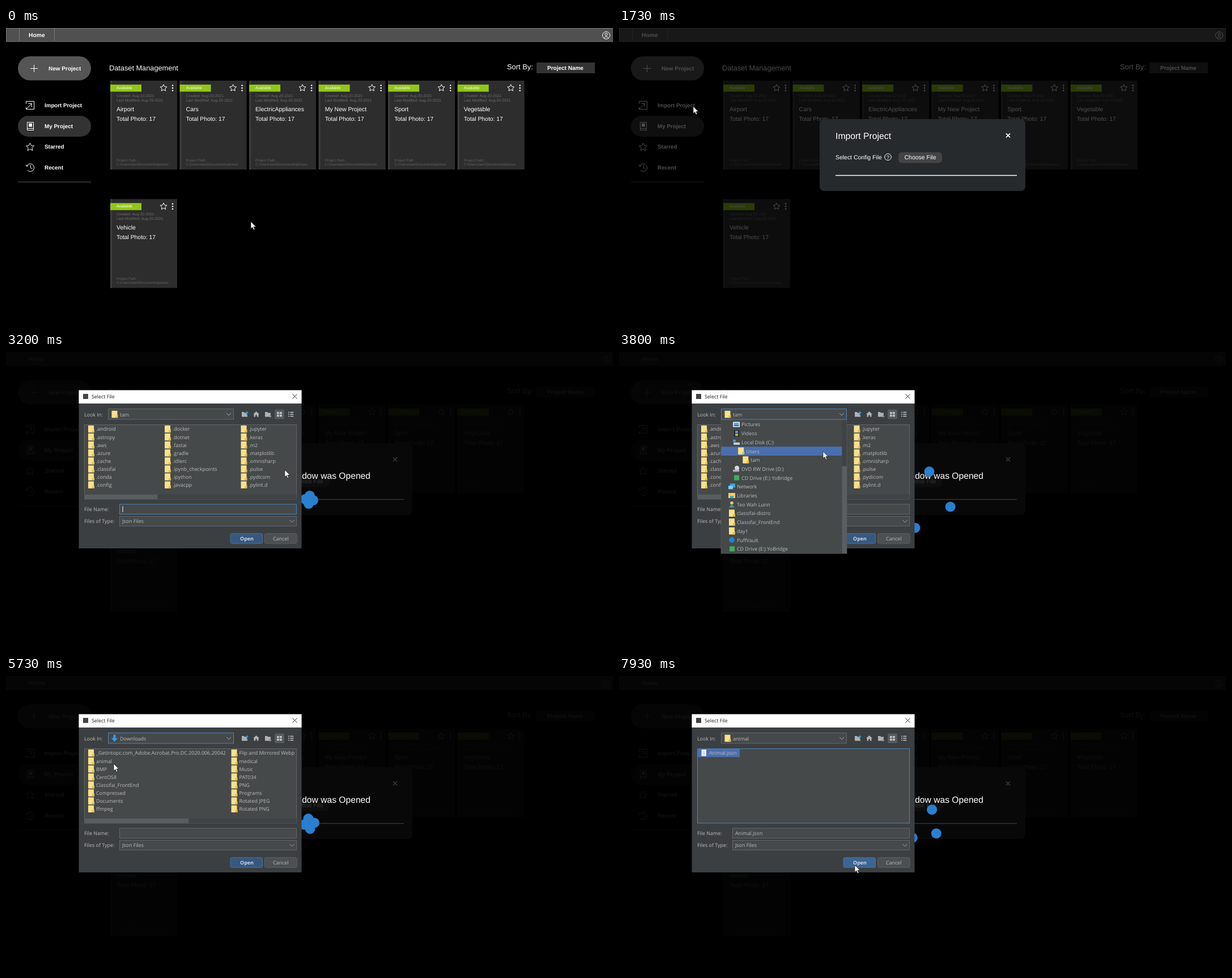
Write an HTML page that moves like this. It is 1071x523 px and loops after 8 s.

```html
<!DOCTYPE html>
<html lang="en">
<head>
<meta charset="utf-8">
<title>Dataset Management</title>
<style>
html, body { margin: 0; width: 100%; height: 100%; overflow: hidden; background: #000; }
svg { display: block; text-rendering: geometricPrecision; }
text { font-family: "Liberation Sans", Arial, sans-serif; white-space: pre; }
.ui text { font-family: "Open Sans", "Noto Sans", sans-serif; }
.line { fill: none; stroke: #fff; stroke-width: 1; }
.focus { stroke: #4a84b8; }
</style>
</head>
<body>
<svg id="stage" width="1071" height="523" viewBox="0 0 1071 523"></svg>
<script>
const LOOP = 8000, FPS = 15;
const USER = 'tam';

// Markup helpers
const text = (x, y, s, size, fill = '#fff', more = '') =>
  `<text x="${x}" y="${y}" font-size="${size}" fill="${fill}" ${more}>${s}</text>`;
const bold = (x, y, s, size = 10, fill = '#fff', more = '') =>
  text(x, y, s, size, fill, 'font-weight="700" ' + more);
const rect = (x, y, w, h, fill, more = '') =>
  `<rect x="${x}" y="${y}" width="${w}" height="${h}" fill="${fill}" ${more}/>`;
const line = (d, more = '') => `<path class="line" d="${d}" ${more}/>`;
const dot = (x, y, r, fill, more = '') => `<circle cx="${x}" cy="${y}" r="${r}" fill="${fill}" ${more}/>`;
const group = (id, body, more = '') => `<g id="${id}" ${more}>${body}</g>`;

function star(cx, cy, r) {
  let d = '';
  for (let i = 0; i < 10; i++) {
    const a = i * Math.PI / 5, q = i % 2 ? r * .48 : r;
    d += `${i ? 'L' : 'M'}${(cx + q * Math.sin(a)).toFixed(2)} ${(cy - q * Math.cos(a)).toFixed(2)}`;
  }
  return line(d + 'Z');
}

// Home page
function card(x, y, name, id) {
  const grey = '#6e6e6e', dim = '#626262';
  return rect(x, y, 118, 157, '#2d2d2d', id ? `id="${id}"` : '') +
    rect(x, y, 3, 157, '#3e3e3e') +
    rect(x, y + 7, 55, 12.5, '#92c61a') +
    text(x + 11, y + 15, 'Available', 6.9) +
    star(x + 94, y + 13, 6.3) +
    [8.5, 13, 17.5].map(v => dot(x + 110, y + v, 1.3, '#fff')).join('') +
    text(x + 11, y + 29, 'Created: Aug-20-2021', 6.75, grey) +
    text(x + 11, y + 37, 'Last Modified: Aug-20-2021', 6.75, grey) +
    text(x + 11, y + 53.5, name, 10.5) +
    text(x + 11, y + 70.5, 'Total Photo: 17', 10.35) +
    text(x + 11, y + 143, 'Project Path :', 6.3, dim) +
    text(x + 11, y + 150, `C:\\Users\\${USER}\\Documents\\picture`, 6.35, dim);
}

const home =
  rect(0, 0, 1071, 24, '#505050') +
  line('M0 .5H1071M0 24H1071M.5 0V24M23.5 0V24M85.5 0V24', 'style="stroke:#757575"') +
  bold(40, 16, 'Home', 10.3) +
  dot(1059, 13, 6.5, 'none', 'class="line"') + dot(1059, 11.2, 2.2, 'none', 'class="line"') +
  line('M1055 17.8Q1059 12.5 1063 17.8') +
  rect(21, 50, 129, 42.5, '#555', 'rx="21.2"') +
  line('M43 71.5H56M49.5 65V78', 'stroke-width="1.2"') +
  bold(75, 75, 'New Project') +
  rect(21, 118.5, 129, 36.5, '#333', 'rx="18" id="importHover"') +
  rect(21, 155.3, 129, 36.7, '#333', 'rx="18.3"') +
  line('M35.5 134V129.5H49.5V143.5H35.5V140M36 143L45 134.2M39.5 133.5H45.3V139.5') +
  line('M37.5 166.5H48.5V180.5H37.5ZM37.5 177.5H48.5') +
  rect(40, 168.5, 6, 6, '#fff') +
  star(42.5, 210.5, 7.3) +
  line('M36.6 244A6.8 6.8 0 1 1 38 251.5M35 241.5L36.6 244.6 39.5 243M43.3 242V247L46.5 249') +
  bold(68, 140.3, 'Import Project', 9.75) + bold(68, 177.3, 'My Project', 9.9) +
  bold(68, 213.3, 'Starred', 9.9) + bold(68, 250, 'Recent', 9.9) +
  line('M21 272H150', 'style="stroke:#5a5a5a"') +
  text(182, 74.5, 'Dataset Management', 12.75) +
  text(884, 73, 'Sort By:', 12.9) +
  rect(936, 61, 103, 19, '#333') + bold(955, 74, 'Project Name') +
  ['Airport', 'Cars', 'ElectricAppliances', 'My New Project', 'Sport', 'Vegetable']
    .map((n, i) => card(184 + 122.55 * i, 93, n, i ? '' : 'firstCard')).join('') +
  card(184, 302.3, 'Vehicle');

const modal =
  rect(354, 161, 363, 127, '#262a2d', 'rx="8"') +
  text(382, 196, 'Import Project', 15.75) +
  line('M683 186.3L690 193.3M690 186.3L683 193.3', 'stroke-width="1.7" style="stroke-width:1.7"') +
  text(382, 231.5, 'Select Config File', 10.45) +
  dot(474.5, 228, 5.8, 'none', 'class="line"') + text(471.8, 231.6, '?', 9.5) +
  rect(493, 219.5, 77, 19, '#444', 'rx="6"') + text(503.5, 231.5, 'Choose File', 10.5) +
  line('M382 260.5H702', 'style="stroke-width:1.6"');

const waiting = rect(0, 0, 1071, 523, '#000', 'opacity=".8"') +
  text(643, 223.5, 'Another Window was Opened', 15.65, '#fff', 'text-anchor="end"') +
  [0, 1, 2, 3].map(() => dot(535, 261, 9, '#2a7fce', 'class="ball"')).join('');

// File dialog
const SIZE = 8.9, INK = '#bcbcbc', FIELD = '#45494a', EDGE = '#646667';
const label = (x, y, s, fill = INK, more = '') => text(x, y, s, SIZE, fill, more);
const folder = (x, y) => rect(x, y, 10, 12.5, '#fbe08a') +
  `<path d="M${x + 7} ${y + 12.5}V${y + 9}L${x + 11} ${y + 7}V${y + 12.5}Z" fill="#e8bc4e"/>`;
const icons = {
  folder,
  pic: (x, y) => rect(x, y + 2, 12, 9, '#eef3f6') + rect(x + 1.5, y + 3.5, 9, 4, '#5fa9dc') + rect(x + 1.5, y + 7.5, 9, 2, '#3b6f8c'),
  vid: (x, y) => rect(x + 2, y + 1, 9, 11, '#23262a') + rect(x + 4, y + 2, 5, 4, '#5b9bd5') + rect(x + 4, y + 7, 5, 4, '#d8a64a'),
  disk: (x, y) => rect(x + 1, y + 7, 11, 4, '#c9ced2') + rect(x, y + 2, 5, 4, '#35a3e0'),
  dvd: (x, y) => dot(x + 7, y + 5, 4, '#d5d8da') + rect(x, y + 8, 11, 3.5, '#aeb3b6'),
  mark: (x, y) => rect(x + 2, y + 2, 9, 9, '#3fae5a'),
  net: (x, y) => rect(x + 3, y + 1, 9, 7, '#3fa3e0') + rect(x, y + 5, 8, 6, '#82cbf2'),
  lib: (x, y) => rect(x, y + 2, 12, 9, '#f4cf62') + rect(x + 3, y + 7, 6, 4, '#4a9fd8'),
  user: (x, y) => dot(x + 6, y + 4, 2.8, '#d8c7a0') + `<path d="M${x + 1} ${y + 12}Q${x + 6} ${y + 3} ${x + 11} ${y + 12}Z" fill="#4f9a68"/>`,
  cloud: (x, y) => dot(x + 6, y + 6.5, 4.8, '#1787d8'),
  down: (x, y) => `<path d="M${x + 3} ${y}H${x + 7}V${y + 6}H${x + 10.5}L${x + 5} ${y + 12.5} ${x - .5} ${y + 6}H${x + 3}Z" fill="#3a9be6"/>`,
  file: (x, y) => rect(x, y, 8.5, 11.5, '#f4f4f4') + line(`M${x + 2} ${y + 4}h4.5m-4.5 2.5h4.5m-4.5 2.5h4.5`, 'style="stroke:#9ab;stroke-width:.7"')
};

const column = (x, names) => names.split(' ').map((n, i) =>
  folder(x, 129.8 + 14.1 * i) + label(x + 14, 139.4 + 14.1 * i, n.replace(/~/g, ' '))).join('');
const scroller = w => rect(138.5, 251.8, 374, 8.4, '#3f4345') + rect(138.5, 251.8, w, 8.4, '#585d60');

const lists =
  group('listHome', column(145, '.android .astropy .aws .azure .cache .classifai .conda .config') +
    column(280, '.docker .dotnet .fastai .gradle .idlerc .ipynb_checkpoints .ipython .javacpp') +
    column(414.5, '.jupyter .keras .m2 .matplotlib .omnisharp .pulse .pydicom .pylint.d') + scroller(129)) +
  group('listDown', rect(139, 143.4, 51, 14, '#4b6eaf', 'id="pickDir"') +
    column(145, '_Getintopc.com_Adobe.Acrobat.Pro.DC.2020.006.20042 animal BMP CentOS8 Classifai_FrontEnd Compressed Documents ffmpeg') +
    column(397.5, 'Flip~and~Mirrored~Webp medical Music PAT034 PNG Programs Rotated~JPEG Rotated~PNG') + scroller(184)) +
  group('listAnimal', rect(139, 128.8, 74, 14.4, '#4b6eaf', 'id="pickFile"') +
    icons.file(145.5, 130) + label(159, 139.4, 'Animal.json'));

const place = (id, icon, name) => group(id, icons[icon](186.5, 103.8) + label(201, 113.6, name));
const field = (id, x, y, w, h) => rect(x, y, w, h, FIELD, `id="${id}" stroke="${EDGE}"`);
const chevron = (x, y) => line(`M${x - 4} ${y - 2}l4 4 4-4`, 'style="stroke:#a5a7a8"');

const dialog =
  rect(128.5, 67.5, 393, 279.5, '#3c3f41') + rect(128.5, 67.5, 393, 23.5, '#fff') +
  rect(136, 74, 9, 9, '#444') +
  label(151, 82.3, 'Select File', '#1c1c1c') +
  line('M505.5 74.5l8 8m0-8l-8 8', 'style="stroke:#222"') +
  label(138, 113.6, 'Look In:') + field('lookIn', 180.5, 100.5, 221, 18.5) + chevron(393, 110) +
  place('inHome', 'folder', USER) + place('inDown', 'down', 'Downloads') + place('inAnimal', 'folder', 'animal') +
  `<path d="M416 106h4l1 1.5h5v7h-10z" fill="#afb1b3"/><path d="M424 112v-4h-2l3-3.5 3 3.5h-2v4z" fill="#3b93d0"/>` +
  `<path d="M436 110l5.5-5 5.5 5h-1.5v4.5h-2.7v-3h-2.6v3h-2.7V110z" fill="#afb1b3"/>` +
  `<path d="M457 106h4l1 1.5h5v4h-2v3h-8z" fill="#afb1b3"/>` + line('M463.5 113.5h5m-2.5-2.5v5', 'style="stroke:#afb1b3"') +
  rect(474, 101.5, 17, 17, '#565a5c', 'rx="2"') +
  [478, 483].map(x => rect(x, 106, 3.8, 3.5, '#c2c4c5') + rect(x, 110.7, 3.8, 3.5, '#c2c4c5')).join('') +
  line('M498 106.5h1.8m1.5 0h6M498 110h1.8m1.5 0h6M498 113.5h1.8m1.5 0h6', 'style="stroke:#c2c4c5;stroke-width:1.4"') +
  field('list', 138.5, 128.5, 374, 131.5) + lists +
  label(138, 281.3, 'File Name:') + field('fileName', 200.5, 269, 312, 17.5) +
  line('M206 272.5V283', 'id="caret"') + label(205, 281.3, 'Animal.json', INK, 'id="typed"') +
  label(138, 302.3, 'Files of Type:') + field('fileType', 200.5, 290.5, 312, 17) +
  label(205, 302.3, 'Json Files') + chevron(504.5, 299) +
  rect(396, 320.8, 56.5, 17.4, '#365880', 'id="open" stroke="#4c708c" rx="2"') +
  label(425, 333, 'Open', '#d0d6dc', 'text-anchor="middle" font-weight="700"') +
  rect(456.5, 320.8, 56.5, 17.4, '#4c5052', 'stroke="#5e6060" rx="2"') +
  label(484.7, 333, 'Cancel', INK, 'text-anchor="middle"');

// Drop-down: level, icon, name
const ROW = 15.7, TOP = 120.2;
const places = [
  [0, 'net', 'Desktop'], [1, 'net', 'This PC'], [2, 'folder', '3D Objects'], [2, 'folder', 'Contacts'],
  [2, 'folder', 'Desktop'], [2, 'folder', 'Documents'], [2, 'down', 'Downloads'], [2, 'folder', 'Music'],
  [2, 'pic', 'Pictures'], [2, 'vid', 'Videos'], [2, 'disk', 'Local Disk (C:)'], [3, 'folder', 'Users'],
  [4, 'folder', USER], [2, 'dvd', 'DVD RW Drive (D:)'], [2, 'mark', 'CD Drive (E:) YoBridge'],
  [1, 'net', 'Network'], [1, 'lib', 'Libraries'], [1, 'user', 'Teo Wah Lunn'], [1, 'folder', 'classifai-distro'],
  [1, 'folder', 'Classifai_FrontEnd'], [1, 'folder', 'day1'], [1, 'cloud', 'PuffVault'], [1, 'mark', 'CD Drive (E:) YoBridge']
];
const menu = rect(180, 120, 222, 236, FIELD) +
  rect(180, TOP, 213.5, ROW, '#4b6eaf', 'id="menuPick"') +
  `<g clip-path="url(#menuClip)">` + group('menuRows', places.map(([lv, ic, n], i) => {
    const x = 193 + 8.1 * (lv - 1), y = TOP + ROW * i;
    return icons[ic](x + (ic === 'folder' ? 1 : 0), y + 1.3) + label(x + 15, y + 11.3, n);
  }).join('')) + '</g>' +
  rect(393.5, 120, 8.5, 236, '#3f4345') + rect(393.5, 120, 8.5, 154, '#5a5e60', 'id="menuThumb"') +
  rect(180, 120, 222, 236, 'none', 'stroke="#5a5d5f" stroke-width=".7"');

document.getElementById('stage').innerHTML =
  `<defs><clipPath id="menuClip">${rect(180, 120, 213, 236, '#000')}</clipPath></defs>` +
  rect(0, 0, 1071, 523, '#000') + home +
  group('importing', rect(0, 0, 1071, 523, '#000', 'opacity=".7"') + modal) +
  group('waiting', waiting) +
  group('dialog', dialog, 'class="ui"') + group('menu', menu, 'class="ui"') +
  `<path id="arrow" d="M0 0V12.6L2.9 10 4.9 14.6 6.9 13.7 4.9 9.2H9Z" fill="#fff" stroke="#111" stroke-width=".7"/>` +
  `<path id="resize" d="M515 234l4-3.5v2.7h7v-2.7l4 3.5-4 3.5v-2.7h-7v2.7z" fill="#fff" stroke="#111" stroke-width=".6"/>`;

// Timeline
const el = id => document.getElementById(id);
const show = (id, on) => el(id).style.display = on ? '' : 'none';
const fade = (id, a) => { show(id, a > 0); el(id).setAttribute('opacity', a); };
const clamp = v => Math.min(1, Math.max(0, v));
const ramp = (t, a, b) => clamp((t - a) / (b - a));
const smooth = x => x * x * (3 - 2 * x);
const smoother = x => x * x * x * (x * (6 * x - 15) + 10);

const path = [
  [0, 432, 342], [800, 432, 342], [1533, 131, 138.5], [1933, 131, 138.5], [2333, 518, 233], [3067, 518, 233],
  [3533, 386, 108], [3667, 386, 108], [3800, 360, 175.5], [4067, 360, 175.5], [4667, 344, 221], [5133, 344, 221],
  [5733, 190, 155], [5867, 178, 148], [6600, 178, 148], [7000, 190, 134], [7300, 190, 134],
  [7900, 416, 334], [LOOP, 416, 334]
];
function pointer(t) {
  const i = Math.max(1, path.findIndex(p => p[0] >= t));
  const [a, x, y] = path[i - 1], [b, u, v] = path[i];
  const k = smooth(ramp(t, a, b));
  return [x + (u - x) * k, y + (v - y) * k];
}

const balls = [...document.querySelectorAll('.ball')];
function spin(t) {
  const x = (t + 20) % 1500 / 1500;
  const turn = Math.PI * (smooth(x) + smoother(x)) / 2;
  const r = 53 * smooth(Math.pow(1 - Math.abs(2 * x - 1), 1.2));
  balls.forEach((b, i) => {
    const a = turn + i * Math.PI / 2;
    b.setAttribute('cx', 535 + r * Math.sin(a));
    b.setAttribute('cy', 261 - r * Math.cos(a));
  });
}

function draw(t) {
  const [x, y] = pointer(t);
  const free = t < 1660;
  el('firstCard').setAttribute('fill', free && x > 184 && x < 302 && y > 93 && y < 250 ? '#353535' : '#2d2d2d');
  show('importHover', free && x < 150 && y < 155);
  fade('importing', t < 1660 ? 0 : t < 1730 ? .5 : 1);
  fade('waiting', ramp(t, 2940, 3200));
  spin(t);

  const grow = t < 2860 ? 0 : t < 2930 ? .25 : t < 2990 ? .6 : 1;
  fade('dialog', grow);
  const s = grow === 1 ? 1 : grow > .5 ? .98 : .95;
  el('dialog').setAttribute('transform', `translate(325 207) scale(${s}) translate(-325 -207)`);

  const focus = t < 3600 ? 'fileName' : t < 5990 ? 'lookIn' : 'list';
  for (const id of ['fileName', 'lookIn', 'list']) el(id).classList.toggle('focus', id === focus);
  const where = t < 5060 ? 'Home' : t < 6390 ? 'Down' : 'Animal';
  for (const w of ['Home', 'Down', 'Animal']) {
    show('in' + w, w === where);
    show('list' + w, w === where);
  }
  show('caret', focus === 'fileName');
  show('pickDir', t > 5990);
  show('pickFile', t > 7260);
  show('typed', t > 7260);
  el('open').setAttribute('fill', x > 396 && y > 320 && t > 7400 ? '#3d6594' : '#365880');

  show('menu', t > 3725 && t < 4790);
  const skip = t < 4060 ? 8 : t < 4190 ? 5 : t < 4330 ? 2 : 0;
  const row = Math.max(0, Math.floor((y - TOP) / ROW));
  el('menuRows').setAttribute('transform', `translate(0 ${-skip * ROW})`);
  el('menuPick').setAttribute('y', TOP + Math.min(14, row) * ROW);
  el('menuThumb').setAttribute('y', 120 + 82 * skip / 8);

  const edge = t > 2860 && t < 3060;
  show('resize', edge);
  show('arrow', !edge);
  el('arrow').setAttribute('transform', `translate(${x} ${y})`);
}

let start;
function tick(now) {
  start ??= now;
  const t = (now - start) % LOOP;
  draw(Math.floor(t * FPS / 1000 + .06) * 1000 / FPS % LOOP);
  requestAnimationFrame(tick);
}
draw(0);
requestAnimationFrame(tick);
</script>
</body>
</html>
```
